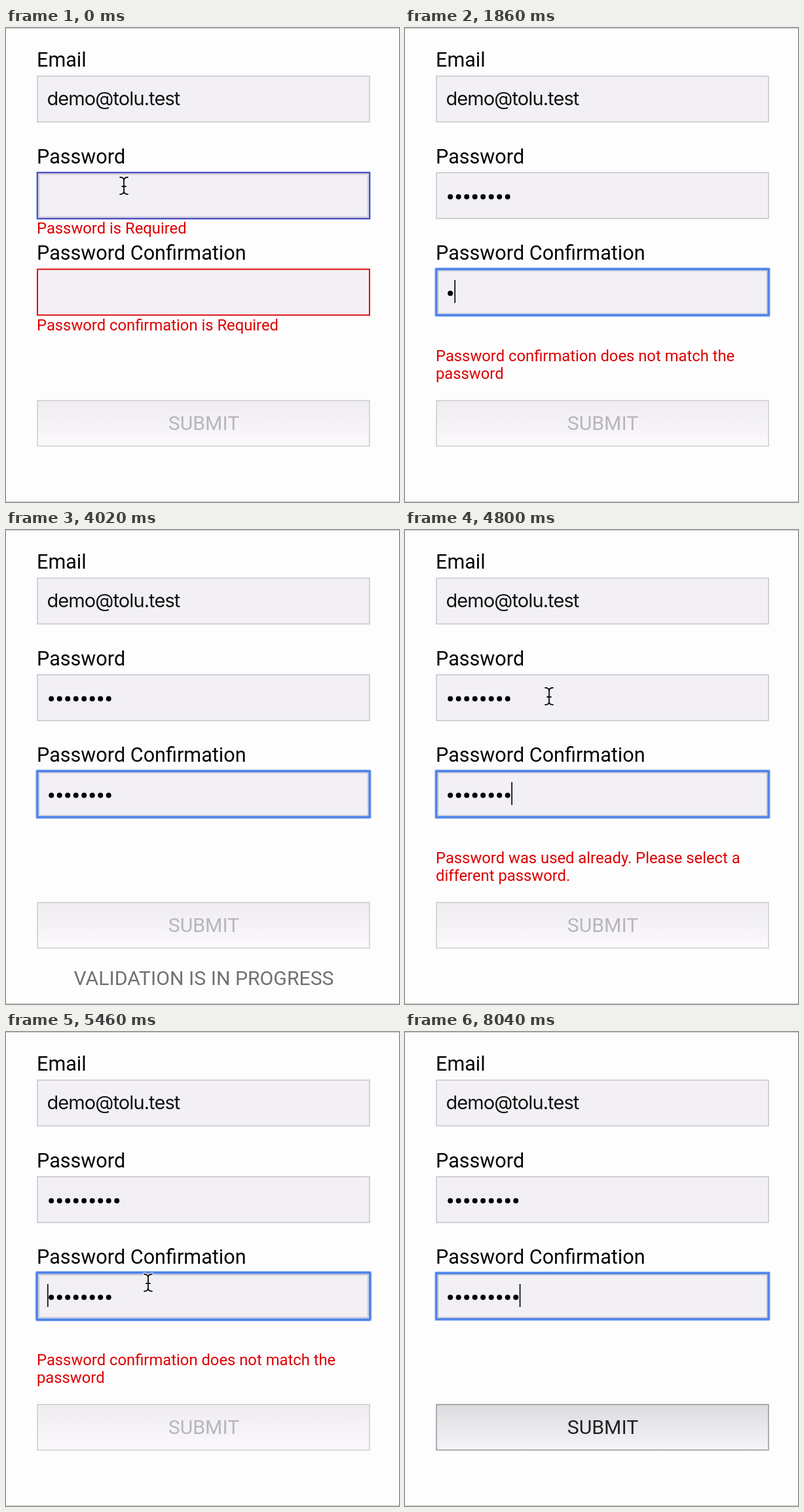
An HTML page for the animation above (8220 ms loop, 600 by 724 pixels).

```html
<!DOCTYPE html>
<html lang="en">
<head>
<meta charset="utf-8">
<title>Form validation</title>
<style>
  html, body { margin: 0; width: 100%; height: 100%; overflow: hidden; background: #fefdfe; }
  svg { display: block; width: 600px; height: 724px; font-family: Roboto, sans-serif; }
  .label { font-size: 30.6px; fill: #050505; }
  .value { font: 29px Inter, sans-serif; letter-spacing: -0.9px; fill: #111; }
  .error { font-size: 23.8px; fill: #dc0000; }
  .caps { font-size: 30.2px; text-anchor: middle; }
  .box { fill: #f2f0f4; stroke: #c9c7cb; stroke-width: 1.6; }
  .box.invalid { stroke: #e00b0b; stroke-width: 2; }
  .ring rect { fill: none; }
  .edge { stroke: #c6c4c8; stroke-width: 1; }
</style>
</head>
<body>
<svg viewBox="0 0 600 724">
  <defs>
    <linearGradient id="dim" x2="0" y2="1"><stop stop-color="#eeecef"/><stop offset="1" stop-color="#fbf9fc"/></linearGradient>
    <linearGradient id="lit" x2="0" y2="1"><stop stop-color="#dcdbde"/><stop offset="1" stop-color="#f6f4f8"/></linearGradient>
  </defs>
  <path class="edge" d="M0 .5H600M0 723.5H600"/>

  <text class="label" x="47" y="59">Email</text>
  <rect class="box" x="48" y="73.5" width="507" height="70"/>
  <text class="value" x="62.5" y="118">demo@tolu.test</text>

  <text class="label" x="47" y="207">Password</text>
  <rect class="box" id="passBox" x="48" y="221" width="507" height="70"/>
  <g id="passDots"></g>

  <text class="label" x="47" y="354">Password Confirmation</text>
  <rect class="box" id="confirmBox" x="48" y="368.5" width="507" height="70"/>
  <g id="confirmDots"></g>

  <g class="ring" id="ring">
    <rect id="glow" stroke="#a9c6f8" stroke-width="3"/>
    <rect id="core" stroke="#5083ea" stroke-width="3.6"/>
    <rect id="inner" stroke="#c3c9d8" stroke-width="1.6"/>
  </g>
  <rect id="caret" width="1.8" height="35" fill="#111"/>

  <text class="error" id="passRequired" x="47" y="314">Password is Required</text>
  <text class="error" id="confirmRequired" x="47" y="461.5">Password confirmation is Required</text>
  <text class="error" id="mismatch" x="47" y="509">Password confirmation does not match the<tspan x="47" dy="27">password</tspan></text>
  <text class="error" id="reused" x="47" y="509">Password was used already. Please select a<tspan x="47" dy="27">different password.</tspan></text>

  <rect id="submitBox" x="48" y="569" width="507" height="69.5" stroke-width="1.6"/>
  <text class="caps" id="submitText" x="302" y="614">SUBMIT</text>
  <text class="caps" id="progress" x="302" y="695" fill="#706f73">VALIDATION IS IN PROGRESS</text>

  <g id="cursor" fill="none" stroke-linecap="round">
    <path id="beam" stroke="#fff" stroke-width="4.4" d="M-6-13Q0-13 0-8Q0-13 6-13M0-8V8M-6 13Q0 13 0 8Q0 13 6 13M-3 1H3"/>
    <use href="#beam"/>
  </g>
</svg>
<script>
const LOOP = 8220, BLINK = 300, STEP = 12.5;
const FIRST_KEY = 420, CONFIRM_KEY = 1800, REUSED = 4080, NINTH_KEY = 5100, CARET_END = 5880, DONE = 7440;
const passKeys = [FIRST_KEY, 570, 720, 870, 990, 1140, 1290, 1440, NINTH_KEY];
const confirmKeys = [CONFIRM_KEY, 1980, 2130, 2280, 2430, 2580, 2760, 2880, 6240];
const focusSteps = [[0, 'pass'], [1620, 'confirm'], [4920, 'pass'], [5340, 'confirm']];
const caretResets = [60, 1620, 4920, 5340, CARET_END, ...passKeys, ...confirmKeys].sort((a, b) => a - b);
// Pointer path: time, x, y
const pointer = [[0, 180, 241], [4440, 180, 241], [4620, 194, 200], [4800, 220, 254], [5220, 220, 254], [5400, 217, 383]];
const fieldTop = { pass: 221, confirm: 368.5 };

const $ = id => document.getElementById(id);
const set = (id, attrs) => { for (const k in attrs) $(id).setAttribute(k, attrs[k]); };
const show = (id, on) => set(id, { visibility: on ? 'visible' : 'hidden' });
const within = (t, a, b) => t >= a && t < b;
const countUntil = (times, t) => times.filter(k => k <= t).length;

// The dark stroke of the pointer reuses the white outline's shape.
const beam = $('beam').cloneNode();
beam.removeAttribute('id');
beam.setAttribute('stroke', '#111');
beam.setAttribute('stroke-width', 1.9);
$('cursor').querySelector('use').replaceWith(beam);

for (const name of ['pass', 'confirm']) {
  for (let i = 0; i < 9; i++) {
    const dot = document.createElementNS('http://www.w3.org/2000/svg', 'circle');
    dot.setAttribute('cx', 69.2 + i * STEP);
    dot.setAttribute('cy', fieldTop[name] + 36.7);
    dot.setAttribute('r', 4);
    $(name + 'Dots').append(dot);
  }
}

function showDots(name, count) {
  [...$(name + 'Dots').children].forEach((dot, i) => dot.setAttribute('visibility', i < count ? 'visible' : 'hidden'));
}

function outline(id, top, grow) {
  set(id, { x: 48 - grow, y: top - grow, width: 507 + 2 * grow, height: 70 + 2 * grow, rx: Math.max(0, grow) });
}

function drawRing(t, top, since) {
  const starting = t < 60;
  const spread = since > 0 ? 3.5 * Math.max(0, 1 - (t - since) / 150) : 0;
  outline('glow', top, (starting ? 0.6 : 1.3) + spread);
  outline('core', top, spread);
  outline('inner', top, -2.4);
  set('core', { stroke: starting ? '#5647bd' : '#5083ea', 'stroke-width': starting ? 2 : 3.6 });
}

function drawPointer(t) {
  const i = pointer.findLastIndex(p => p[0] <= t);
  const [t0, x0, y0] = pointer[i], [t1, x1, y1] = pointer[i + 1] || [LOOP, x0, y0];
  const u = (t - t0) / (t1 - t0), k = u * u * (3 - 2 * u);
  set('cursor', { transform: `translate(${x0 + (x1 - x0) * k} ${y0 + (y1 - y0) * k})` });
  show('cursor', t < FIRST_KEY || within(t, 4440, NINTH_KEY) || within(t, 5220, CARET_END));
}

function render(t) {
  const counts = { pass: countUntil(passKeys, t), confirm: countUntil(confirmKeys, t) };
  const [since, focus] = focusSteps.findLast(s => s[0] <= t);
  const top = fieldTop[focus];
  showDots('pass', counts.pass);
  showDots('confirm', counts.confirm);
  $('passBox').classList.toggle('invalid', t < FIRST_KEY);
  $('confirmBox').classList.toggle('invalid', t < CONFIRM_KEY);
  drawRing(t, top, since);

  const reset = caretResets.findLast(r => r <= t);
  const caretAt = within(t, 5340, CARET_END) ? 0 : counts[focus];
  set('caret', { x: 62.9 + caretAt * 12.42, y: top + 16.5 });
  show('caret', reset !== undefined && Math.floor((t - reset) / BLINK) % 2 === 0);

  show('passRequired', t < FIRST_KEY);
  show('confirmRequired', t < CONFIRM_KEY);
  show('mismatch', within(t, FIRST_KEY, 2880) || within(t, NINTH_KEY, 6240));
  show('reused', within(t, REUSED, NINTH_KEY));
  show('progress', within(t, 2880, REUSED) || within(t, 6240, DONE));

  const ready = t >= DONE;
  set('submitBox', { fill: ready ? 'url(#lit)' : 'url(#dim)', stroke: ready ? '#9b999d' : '#cfcdd1' });
  set('submitText', { fill: ready ? '#222' : '#b8b6ba' });
  drawPointer(t);
}

const start = performance.now();
function tick() {
  render((performance.now() - start) % LOOP);
  requestAnimationFrame(tick);
}
render(0);
tick();
</script>
</body>
</html>
```
